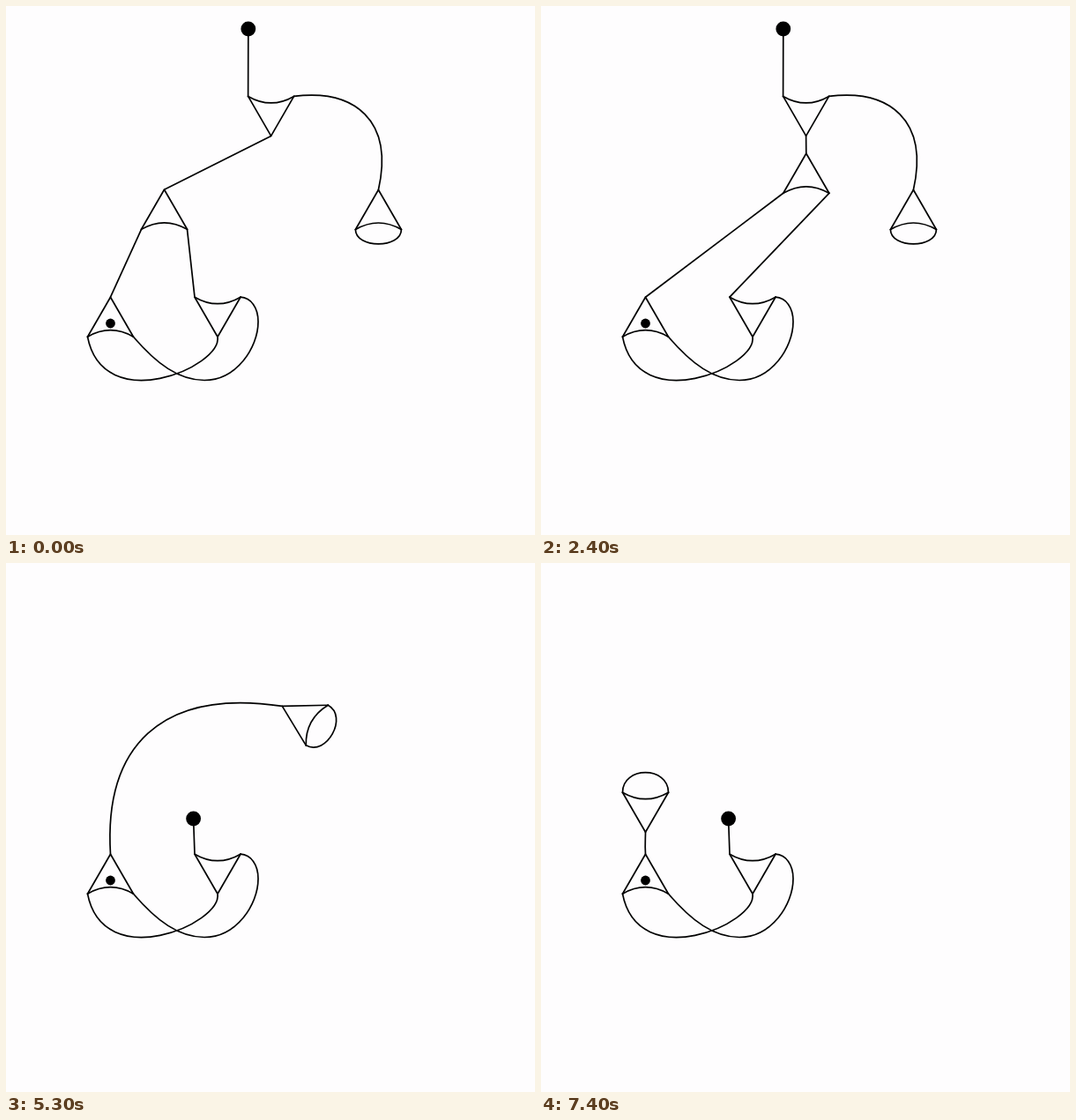
An HTML page with a canvas for the animation above (8 s loop, 600x600 px).

```html
<!DOCTYPE html>
<html>
<head>
<meta charset="utf-8">
<style>
html, body { margin: 0; width: 100%; height: 100%; overflow: hidden; background: #fefdfe; }
canvas { display: block; width: 600px; height: 600px; }
</style>
</head>
<body>
<canvas id="stage" width="600" height="600"></canvas>
<script>
const ctx = document.getElementById('stage').getContext('2d');
const LOOP = 8000, STEP = 100;
const CLIMB_START = 300, CLIMB_TIME = 2100;
const SWING_START = 4200, SWING_TIME = 2300;

const mix = (a, b, s) => a + (b - a) * s;
const clamp = s => Math.min(Math.max(s, 0), 1);
const smooth = s => (s = clamp(s)) * s * (3 - 2 * s);
const easeInOut = s => s < 0.5 ? 4 * s ** 3 : 1 - 4 * (1 - s) ** 3;

function line(...points) {
  ctx.beginPath();
  points.forEach(p => ctx.lineTo(...p));
  ctx.stroke();
}

function curve(start, ...segments) {
  ctx.beginPath();
  ctx.moveTo(...start);
  segments.forEach(s => ctx.bezierCurveTo(...s));
  ctx.stroke();
}

function disc(x, y, r) {
  ctx.beginPath();
  ctx.arc(x, y, r, 0, 7);
  ctx.fill();
}

// Draws a cone node around its centroid and returns its ports
function cone(x, y, angle, reach) {
  const cos = Math.cos(angle), sin = Math.sin(angle);
  const at = (u, v) => [x + u * cos - v * sin, y + u * sin + v * cos];
  const apex = at(0, -30), left = at(-26, 15), right = at(26, 15);
  line(left, apex, right);
  curve(left, [...at(-8.7, 5), ...at(8.7, 5), ...right]);
  if (reach) curve(left, [...at(-26, 15 + reach), ...at(26, 15 + reach), ...right]);
  return { apex, left, right, down: [-sin, cos] };
}

// Straight wire whose ends are pulled towards their port directions
function wire(a, dirA, b, dirB, pull) {
  const handle = (p, dir, q) =>
    p.map((v, i) => v + mix((q[i] - v) / 3, dir[i] * 25, pull));
  curve(a, [...handle(a, dirA, b), ...handle(b, dirB, a), ...b]);
}

function drawClimb(t, base, hook, bell) {
  const p = clamp((t - CLIMB_START) / CLIMB_TIME);
  const lean = Math.sin(Math.PI * p ** 1.5) ** 2;
  const top = cone(300.6, 117.4, Math.PI);
  const climber = cone(
    mix(179.5, 300.8, smooth(p ** 2.3)), mix(238.3, 197.3, smooth(p)), 0.96 * lean);

  line([274.8, 26], top.right);
  disc(274.8, 26, 8.4);
  line(top.apex, climber.apex);
  curve(top.left, [396, 94, 440, 130, ...bell.apex]);
  wire(climber.left, climber.down, base.apex, [0, -1], 0.45 * lean);
  wire(climber.right, climber.down, hook.right, [0, -1], 0.45 * lean);
}

// The joined wire keeps its shape relative to the distance it spans
function drawSwing(elapsed, base, hook, bell, across, rise, drop) {
  const fall = easeInOut(clamp(elapsed / 1000));
  const ball = [mix(274.8, 212.6, fall), mix(26, 290, fall)];
  line(ball, hook.right);
  disc(...ball, 8.4);

  const [ax, ay] = bell.apex, [bx, by] = base.apex;
  const span = Math.hypot(ax - bx, ay - by);
  curve(bell.apex, [
    ax - span * (1 - across) * (0.28 + 1.7 * across),
    ay + span * (-0.35 + 0.27 * rise + 0.4 * drop),
    bx + span * (0.22 - 0.25 * rise),
    by - span * (0.35 + 0.12 * rise),
    ...base.apex
  ]);
}

function draw(t) {
  ctx.fillStyle = '#fefdfe';
  ctx.fillRect(0, 0, 600, 600);
  ctx.fillStyle = ctx.strokeStyle = '#000';
  ctx.lineWidth = 1.7;
  ctx.lineJoin = ctx.lineCap = 'round';

  const base = cone(118.5, 360.2, 0);
  const hook = cone(240, 345.2, Math.PI);
  disc(118.5, 360, 5.4);
  curve(base.left, [110, 466, 245, 410, ...hook.apex]);
  curve(base.right, [171, 406, 196, 424.5, 225, 424.5],
    [261, 424.5, 286, 388, 286, 358], [286, 342, 278, 331, ...hook.left]);

  const elapsed = t - SWING_START, p = clamp(elapsed / SWING_TIME);
  const across = smooth(p ** 1.45);
  const rise = smooth(elapsed / 1150), drop = smooth((elapsed - 1750) / 1450);
  const bell = cone(
    mix(422.4, 118.5, across),
    238.5 - 62 * rise + 98.7 * drop,
    -Math.PI * smooth(p ** 1.27),
    21.7 + 8.3 * Math.sin(1.5 * Math.PI * p) ** 2);

  if (elapsed > 0) drawSwing(elapsed, base, hook, bell, across, rise, drop);
  else drawClimb(t, base, hook, bell);
}

const began = performance.now();
function tick() {
  const t = (performance.now() - began) % LOOP;
  draw(Math.floor(t / STEP) * STEP);
  requestAnimationFrame(tick);
}
tick();
</script>
</body>
</html>
```
